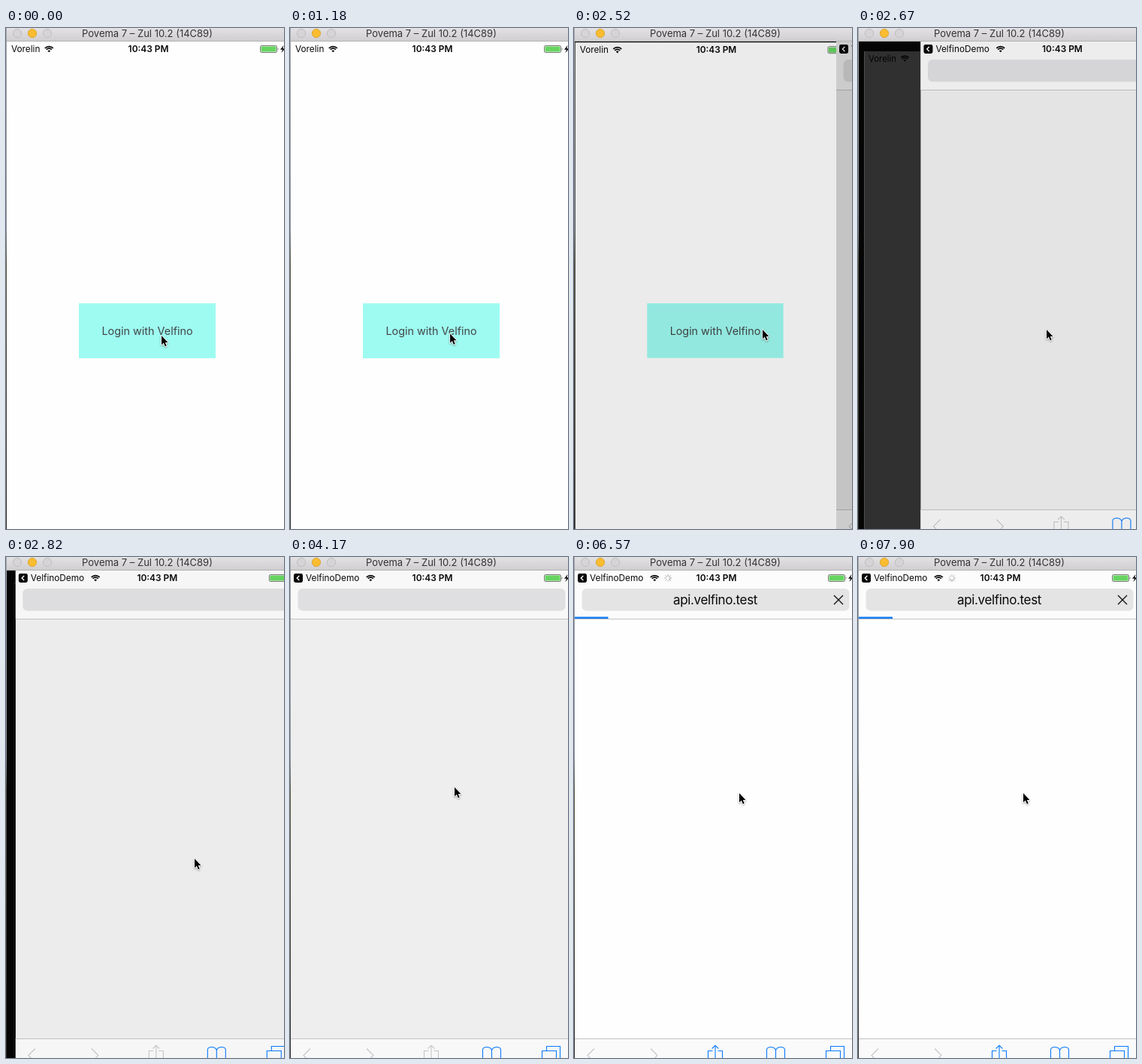
Recreate the animation shown at these times as an HTML page. Size 370 px wide and 666 px high, loop 8 s.

```html
<!DOCTYPE html>
<html lang="en">
<head>
<meta charset="utf-8">
<title>Login flow</title>
<style>
  html, body { margin: 0; width: 100%; height: 100%; overflow: hidden; background: #fefefe; }
  svg { display: block; width: 370px; height: 666px; }
  text { font-family: Inter, "Liberation Sans", sans-serif; white-space: pre; }
  .status { font-size: 11.8px; fill: #080808; }
  .clock { font-size: 11.9px; font-weight: 600; text-anchor: middle; }
  .mid { text-anchor: middle; }
  .icon { fill: none; stroke: #0a7aff; stroke-width: 1.1; }
  .off { stroke: #c6c6c8; }
</style>
</head>
<body>
<svg viewBox="0 0 370 666" xmlns="http://www.w3.org/2000/svg">
  <defs>
    <linearGradient id="bar" x1="0" y1="0" x2="0" y2="1">
      <stop offset="0" stop-color="#e3e1e3"/><stop offset="1" stop-color="#d0ced0"/>
    </linearGradient>
    <linearGradient id="desk" x1="0" y1="0" x2="0" y2="1">
      <stop offset="0" stop-color="#a3a5ab"/><stop offset=".4" stop-color="#85919c"/>
      <stop offset=".47" stop-color="#56543c"/><stop offset="1" stop-color="#2a2723"/>
    </linearGradient>
    <filter id="shade" x="-60%" y="-40%" width="240%" height="200%">
      <feDropShadow dx="0" dy="1" stdDeviation=".9" flood-opacity=".4"/>
    </filter>
    <clipPath id="screen"><rect x="1" y="18" width="369" height="648"/></clipPath>
    <g id="wifi" fill="none" stroke="#080808" stroke-width="1.7">
      <path d="M-5.5-5.5A7.8 7.8 0 0 1 5.5-5.5M-3.6-3.6A5.1 5.1 0 0 1 3.6-3.6"/>
      <path d="M0 0L-1.9-1.9A2.7 2.7 0 0 1 1.9-1.9Z" fill="#080808" stroke="none"/>
    </g>
    <g id="power">
      <text class="status clock" x="189.5" y="32.3">10:43 PM</text>
      <rect x="338.5" y="23.5" width="22" height="9" rx="1.6" fill="none" stroke="#6b6b6b" stroke-width=".9"/>
      <rect x="339.5" y="24.5" width="20" height="7" rx=".6" fill="#66d45f"/>
      <path d="M361.8 26.3q1.5 1.7 0 3.5z" fill="#333"/>
      <path d="M369.5 23L365 28.8H368L366.4 33L371.5 27.2H368.4Z" fill="#080808"/>
    </g>
  </defs>

  <g clip-path="url(#screen)">
    <rect y="18" width="370" height="648" fill="#050505"/>

    <g id="app">
      <rect x="1" y="18" width="375" height="667" fill="#fefefe"/>
      <text class="status" x="7" y="32.3">Vorelin</text>
      <use href="#wifi" x="57.3" y="32.3"/>
      <use href="#power"/>
      <rect x="97" y="366" width="182" height="73" fill="#9efbf1"/>
      <text id="label" class="mid" x="188" y="408" font-size="14.4" fill="#414646">Login with Velfino</text>
      <rect id="appDim" x="1" y="18" width="375" height="667"/>
    </g>

    <g id="web">
      <rect id="page" x="1" y="18" width="375" height="667"/>
      <rect id="head" x="1" y="18" width="375" height="64"/>
      <rect x="1" y="82" width="375" height="1" fill="#c3c3c5"/>
      <rect x="5" y="22" width="12" height="12" rx="2.4" fill="#080808"/>
      <path d="M12.3 25L9.3 28L12.3 31" fill="none" stroke="#fff" stroke-width="1.4"/>
      <text class="status" x="21" y="32.3">VelfinoDemo</text>
      <use href="#wifi" x="107.3" y="32.3"/>
      <use href="#power"/>
      <rect id="field" x="10.5" y="42" width="356" height="29.5" rx="6"/>

      <g id="loading">
        <g id="spin" stroke="#222" stroke-width=".9"></g>
        <text class="mid" x="188" y="63" font-size="17" letter-spacing="-.35" fill="#080808">api.velfino.test</text>
        <path d="M346 51L358 63M358 51L346 63" stroke="#111" stroke-width="1.4"/>
        <rect id="progress" x="1" y="79.5" height="2.5" fill="#147cf5"/>
      </g>

      <rect id="foot" x="1" y="640" width="375" height="45"/>
      <rect x="1" y="640" width="375" height="1" fill="#c3c3c5"/>
      <path class="icon off" d="M27 653.5L18 662.5L27 671.5M102 653.5L111 662.5L102 671.5"/>
      <path id="share" class="icon" d="M184.5 656.5H178.5V675H197.5V656.5H191.5M188 669V649.5M183.7 653.5L188 649.2L192.3 653.5"/>
      <path class="icon" d="M268.5 672V656C267.5 650.2 257.5 650.2 256.5 654.5V672M268.5 656C269.5 650.2 279.5 650.2 280.5 654.5V672"/>
      <path class="icon" d="M335.5 656.5H354.5V675H335.5ZM341.5 656.5V650.5H359.5V669.5H354.5"/>
      <rect id="webDim" x="1" y="18" width="375" height="667"/>
    </g>
  </g>

  <rect width="1" height="666" fill="url(#desk)"/>
  <rect x="1" width="369" height="17" fill="url(#bar)"/>
  <rect x="1" y="17" width="369" height="1" fill="#b4b2b4"/>
  <g stroke-width=".9">
    <circle cx="15" cy="7" r="5.6" fill="#d6d4d6" stroke="#bdbbbd"/>
    <circle cx="35" cy="7" r="5.6" fill="#fabd31" stroke="#dda02a"/>
    <circle cx="55" cy="7" r="5.6" fill="#d6d4d6" stroke="#bdbbbd"/>
  </g>
  <text class="mid" x="188" y="12" font-size="13" fill="#333">Povema 7 – Zul 10.2 (14C89)</text>

  <g id="cursor" filter="url(#shade)">
    <path d="M0 0V12.2L2.8 9.6L4.8 14.3L6.7 13.5L4.8 8.9H8.5Z" fill="#000" stroke="#fff" stroke-width="1.6" paint-order="stroke" stroke-linejoin="round"/>
  </g>
</svg>

<script>
const LOOP = 8000, STEP = 150, SHIFT = 30;
const OPEN = 2493, LOAD = 5820, PAGE = 5970;
const SPOKES = 8;

const $ = id => document.getElementById(id);
const set = (id, attrs) => {
  for (const k in attrs) $(id).setAttribute(k, attrs[k]);
};

// The screen refreshes on a coarse, slightly early grid.
const snap = t => Math.floor((t + SHIFT) / STEP) * STEP - SHIFT;
const phase = (t, from, to) => Math.min(1, Math.max(0, (t - from) / (to - from)));
const smooth = u => u * u * (3 - 2 * u);
const mix = (a, b, u) => a + (b - a) * u;
const curve = (a, b, c, u) => mix(mix(a, b, u), mix(b, c, u), u);

// Critically damped spring, falling from 1 to 0.
const spring = t => {
  const a = Math.max(0, t) * .0162;
  return (1 + a) * Math.exp(-a);
};

// Swing past the button, move up to the page, then drift down.
function pointer(t) {
  const swing = smooth(phase(t, 1020, 2220));
  const lift = smooth(phase(t, 3270, 3720));
  const drift = phase(t, 4620, 5820);
  return [
    curve(207, 280, 251, swing) - 32 * lift + drift,
    curve(409, 378, 401, swing) - 95 * lift + 8 * drift
  ];
}

for (let i = 0; i < SPOKES; i++) {
  const spoke = document.createElementNS("http://www.w3.org/2000/svg", "path");
  spoke.setAttribute("d", "M0-2V-4.8");
  spoke.setAttribute("transform", `rotate(${i * 360 / SPOKES})`);
  spoke.setAttribute("opacity", mix(.25, .65, i / (SPOKES - 1)));
  $("spin").append(spoke);
}

function draw(time) {
  const t = snap(time);
  const [x, y] = pointer(t);
  const rest = spring(t - OPEN);
  const p = 1 - rest;
  const loaded = t >= PAGE;

  set("cursor", { transform: `translate(${x} ${y})` });
  set("label", { opacity: t < 120 ? 1 : mix(.3, 1, phase(t, 120, 570)) });
  set("app", { transform: `translate(188.5 351.5) scale(${1 - .05 * p}) translate(-188.5 -351.5)` });
  set("appDim", { opacity: Math.min(1, p * 1.04) });
  set("web", { transform: `translate(${375 * rest} 0)` });
  set("webDim", { opacity: .19 * rest });

  set("page", { fill: loaded ? "#fefefe" : "#eeeeee" });
  set("head", { fill: loaded ? "#fcfcfc" : "#f8f8f8" });
  set("foot", { fill: loaded ? "#fafafa" : "#f8f8f8" });
  set("field", { fill: loaded ? "#e4e4e5" : "#dfdfe1" });
  set("share", { class: loaded ? "icon" : "icon off" });

  const turn = Math.floor(t / 1000 * SPOKES) * 360 / SPOKES;
  set("loading", { visibility: t >= LOAD ? "visible" : "hidden" });
  set("spin", { transform: `translate(125 28) rotate(${turn})` });
  set("progress", { width: 45 * (1 - Math.exp(-Math.max(0, t - LOAD + STEP) / 200)) });
}

const start = performance.now();
function frame() {
  draw((performance.now() - start) % LOOP);
  requestAnimationFrame(frame);
}
frame();
</script>
</body>
</html>
```
